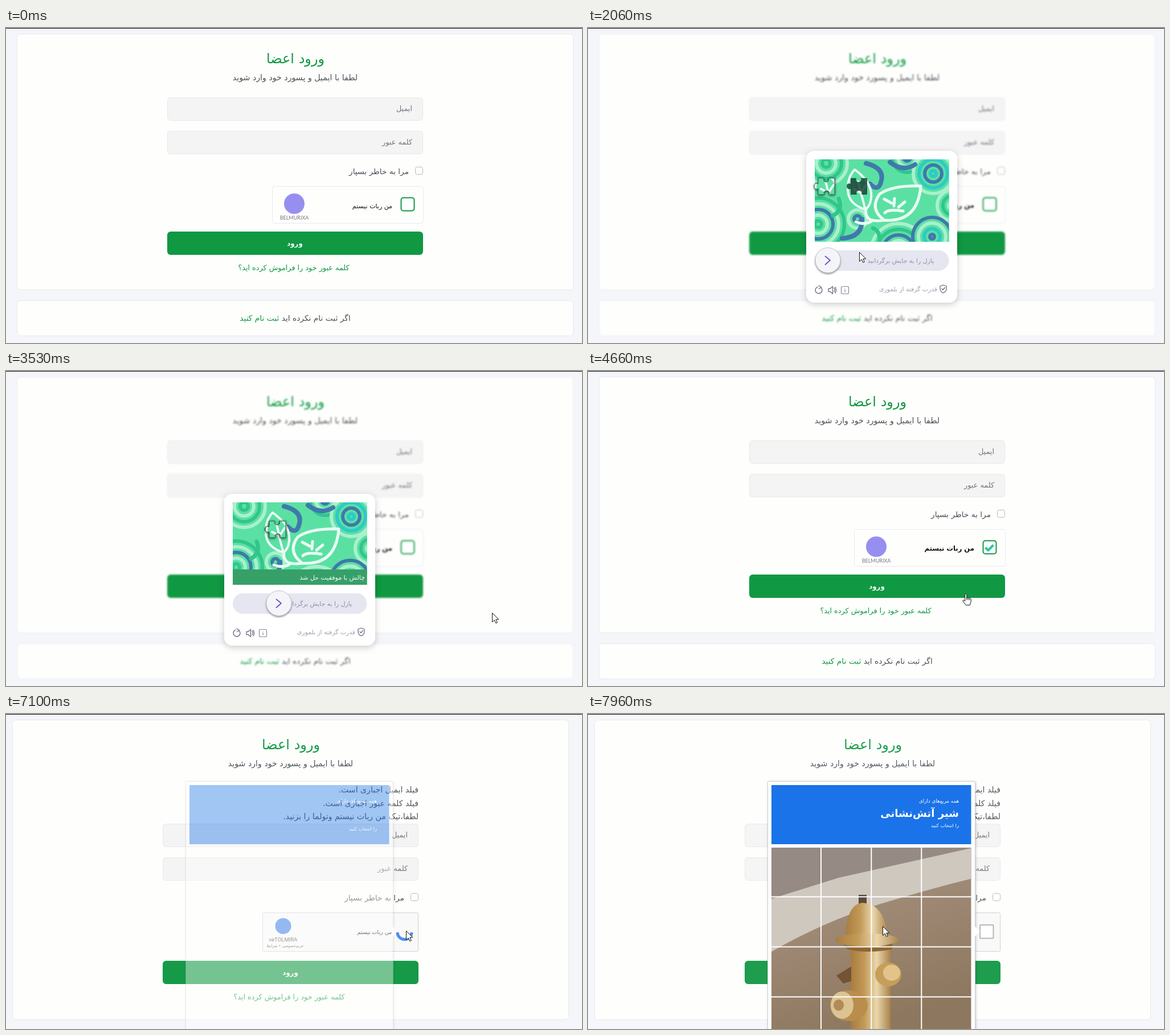
These frames come from a looping animation (1011 px wide and 554 px high, 8 s). An HTML page:

```html
<!DOCTYPE html>
<html lang="fa">
<head>
<meta charset="utf-8">
<style>
html, body { margin: 0; width: 100%; height: 100%; overflow: hidden; background: #f4f6fa; }
svg { display: block; }
text { font-family: "DejaVu Sans", sans-serif; direction: rtl; }
.latin { direction: ltr; }
#modalCard { filter: drop-shadow(0 3px 6px #0003); }
#knob circle { filter: drop-shadow(0 2px 1.5px #0006); }
#piece { filter: drop-shadow(0 1px 2px #000a); }
#popupBox { filter: drop-shadow(1px 1px 2px #0003); }
</style>
</head>
<body>
<svg id="stage" width="1011" height="554" viewBox="0 0 1011 554"></svg>
<script>
const GREEN = '#119843', INK = '#4d5158', GREY = '#70757c';

const rect = (x, y, w, h, r, fill, stroke = 'none', extra = '') =>
  `<rect x="${x}" y="${y}" width="${w}" height="${h}" rx="${r}" fill="${fill}" stroke="${stroke}" ${extra}/>`;
const text = (x, y, size, str, fill = INK, extra = '') =>
  `<text x="${x}" y="${y}" font-size="${size}" fill="${fill}" ${extra}>${str}</text>`;
const line = (d, color, width, extra = '') =>
  `<path d="${d}" fill="none" stroke="${color}" stroke-width="${width}" stroke-linecap="round" stroke-linejoin="round" ${extra}/>`;
const mid = 'text-anchor="middle"';

// Login form; the two pages differ by how far the lower parts are pushed down.
function form(x, pushFields, pushButton, cardHeight) {
  const field = (y, label) => rect(x + 264.5, y + .5, 448, 40, 5, '#f4f4f5', '#e6e7e9') +
    text(x + 694, y + 24, 12.8, label, GREY);
  const f = pushFields, b = pushButton;
  return rect(x + .5, 10.5, 976, cardHeight, 6, '#fefffd', '#e6e8ec') +
    text(x + 489, 62, 24, 'ورود اعضا', GREEN, mid) +
    text(x + 488.5, 92, 14.2, 'لطفا با ایمیل و پسورد خود وارد شوید', INK, mid) +
    field(122 + f, 'ایمیل') + field(181 + f, 'کلمه عبور') +
    rect(x + 699.5, 244.5 + f, 13, 13, 3, '#fff', '#b4b8be') +
    text(x + 688, 257 + f, 13.7, 'مرا به خاطر بسپار') +
    rect(x + 264, 358 + b, 449, 41, 6, GREEN) +
    text(x + 488, 383 + b, 11.8, 'ورود', '#fff', mid + ' font-weight="bold"') +
    text(x + 486, 426 + b, 12.8, 'کلمه عبور خود را فراموش کرده اید؟', GREEN, mid);
}

const firstPage = form(19, 0, 0, 450) +
  rect(19.5, 479.5, 976, 62, 6, '#fefffd', '#e6e8ec') +
  text(507.5, 515, 13.8, `اگر ثبت نام نکرده اید <tspan fill="${GREEN}">ثبت نام کنید</tspan>`, INK, mid) +
  rect(467.5, 278.5, 265, 65, 4, '#fefffd', '#e6e8f0') +
  '<circle cx="506" cy="309" r="18" fill="#968ff0"/>' +
  text(506, 337, 9, 'BELMURIXA', '#77777f', mid + ' class="latin" style="font-family:Lato,sans-serif"') +
  text(678, 317, 11, 'من ربات نیستم', '#111', 'id="labelPlain"') +
  text(678, 316, 11.6, 'من ربات نیستم', '#111', 'id="labelBold" font-weight="bold"') +
  rect(693.5, 298.5, 23, 23, 4, '#fff', GREEN, 'stroke-width="2"') +
  line('M697.5 310.5l5 5 9-9.5', '#2fc3a0', 4, 'id="check" style="stroke-linecap:butt"');

const secondPage = form(11, 71, 76, 527) +
  ['فیلد ایمیل اجباری است.', 'فیلد کلمه عبور اجباری است.', 'لطفا،تیک من ربات نیستم وتولما را بزنید.']
    .map((s, i) => text(724, 138 + 23.7 * i, 14.1, s)).join('') +
  rect(450.5, 349.5, 273, 68, 2, '#f9f9f9', '#d0d0d0') +
  '<circle cx="486.5" cy="373" r="14" fill="#4a86e8"/>' +
  text(486.5, 400, 9.6, 'veTOLMIRA', '#555', mid + ' class="latin" style="font-family:Roboto,sans-serif"') +
  text(490, 410, 6.6, 'حریم&zwnj;خصوصی • شرایط', '#555', mid) +
  text(677, 387, 9.5, 'من ربات نیستم', '#111') +
  '<g id="box">' + rect(688, 371, 23.5, 23.5, 1, '#fff', '#b4b4b4', 'stroke-width="2"') + '</g>' +
  `<g id="spinner">${line('M687 384a12.5 12.5 0 0 0 25 0', '#4a8af4', 5, 'style="stroke-linecap:butt"')}</g>`;

// Puzzle artwork: concentric swirls with two leaves on top.
const MINT = '#5be0a3', PALE = '#a9f0cd', LEAF = '#31c68b', BLUE = '#4079ab', TEAL = '#2ecbc4', WHITE = '#e9fdf3';
const rings = (x, y, r, ...colors) => colors.map((c, i) =>
  `<circle cx="${x}" cy="${y}" r="${r + 10 * (colors.length - 1 - i)}" fill="${MINT}" stroke="${c}" stroke-width="6"/>`).join('');
const art = rect(398, 231, 236, 145, 0, MINT) +
  rings(418, 238, 7, PALE, LEAF, PALE, LEAF) +
  rings(560, 228, 6, LEAF, PALE, BLUE) +
  rings(545, 392, 8, PALE, LEAF, BLUE, PALE, LEAF) +
  rings(640, 312, 7, PALE, LEAF, PALE) +
  rings(404, 345, 6, LEAF, PALE, BLUE, PALE, LEAF) +
  rings(606, 256, 5, PALE, TEAL, BLUE, TEAL) +
  rings(604, 367, 4, BLUE, PALE, TEAL, BLUE) +
  rings(473, 336, 6, PALE, BLUE) +
  line('M488 238Q520 246 515 268T495 274M530 236Q553 254 574 240', BLUE, 8) +
  line('M446 370Q482 368 481 336', BLUE, 8) +
  line('M440 300Q448 320 430 330M500 352Q512 356 512 374', LEAF, 7) +
  line('M488 318Q484 344 520 338M470 341Q488 348 500 338', WHITE, 5) +
  line('M468 249Q500 272 497 299Q495 314 487 319Q455 310 456 281Q456 262 468 249Z', WHITE, 4, `style="fill:${MINT}"`) +
  line('M474 270L479 290L488 276M466 283L479 290L486 316', WHITE, 4) +
  line('M584 278Q579 342 520 338Q493 318 512 292Q535 276 584 278Z', WHITE, 5, `style="fill:${MINT}"`) +
  line('M520 301L533 308M538 300L537 313M521 325Q527 318 553 322M545 315L556 306', WHITE, 5);
const jigsaw = 'M461 264h10q-2 6 4 7 6-1 4-7h11v29h-10q2-6-4-7-7 1-4 7h-11v-10q-7 2-7-5 0-6 7-4z';

const modal = rect(383, 216, 265, 267, 14, '#fff', 'none', 'id="modalCard"') +
  '<use href="#art" clip-path="url(#artClip)"/>' +
  `<path d="${jigsaw}" fill="#173c31" opacity=".82"/>` +
  `<g id="piece"><g clip-path="url(#pieceClip)"><use href="#art"/></g><path d="${jigsaw}" fill="none" stroke="#3a5a50"/></g>` +
  '<g id="success">' + rect(398, 349, 235.5, 27, 0, '#37a068') +
  text(630, 367, 11, 'چالش با موفقیت حل شد', '#fff') + '</g>' +
  rect(398, 391, 235.5, 36, 18, '#e6e6f0') +
  text(607, 413, 10.8, 'پازل را به جایش برگردانید', '#8d8da6') +
  '<g id="knob"><circle cx="421" cy="408.5" r="22" fill="#f5f5f9" stroke="#c4c4cc"/>' +
  line('M416.5 401.5l8.5 7-8.5 7.5', '#5f55cf', 1.8) + '</g>' +
  text(613, 463, 10.8, 'قدرت گرفته از بلموری', '#a0a0b0') +
  line('M623.5 452l5.5 2v4.5q0 5-5.5 7.5q-5.5-2.5-5.5-7.5v-4.5zM621 458.5l2 2 3.5-4', '#6a6a80', 1.3) +
  line('M409 456.5a6 6 0 1 1-6-1.2M405 453l4.5 3-4 2.5', '#6a6a80', 1.4) +
  line('M422 458.5h3l4.5-4v13l-4.5-4h-3zM432 457q2.5 3.5 0 7M434 455.5q3 5.5 0 10.5', '#6a6a80', 1.3) +
  rect(444.5, 454.5, 13, 13, 2.5, 'none', '#8a8a9c', 'stroke-width="1.2"') +
  line('M451 460v4.5M451 457.5v.1', '#8a8a9c', 1.2);

const photo = rect(322, 235, 350.5, 320, 0, '#958b84') +
  '<path d="M322 325L440 288L672 236V560H322Z" fill="#cfc8bf"/>' +
  '<path d="M322 418Q420 362 520 332T672 290V560H322Z" fill="url(#grass)"/>' +
  '<path d="M475 318h14v18h-14z" fill="#5b4a39"/>' +
  '<g fill="url(#metal)"><path d="M461 405H531V560H461Z"/>' +
  '<path d="M452 396Q453 334 482 332Q520 334 526 390Z"/>' +
  '<ellipse cx="490" cy="397" rx="56" ry="11"/></g>' +
  '<path d="M448 406q45 10 86-2v10q-45 8-78 0z" fill="#8d6733"/>' +
  '<path d="M436 460l26-16v26l-14 4z" fill="#735333"/>' +
  '<ellipse cx="527" cy="458" rx="23" ry="21" fill="#c79d5b"/><ellipse cx="533" cy="455" rx="15" ry="14" fill="#e2c48b"/>' +
  '<ellipse cx="458" cy="513" rx="33" ry="27" fill="#b98d4c"/><ellipse cx="446" cy="512" rx="20" ry="24" fill="#dcc394"/>' +
  '<ellipse cx="440" cy="512" rx="9" ry="10" fill="#b08b56"/>' +
  line('M409 235V554M497.3 235V554M585.3 235V554M322 321.5H672M322 409.5H672M322 497.5H672', '#fff', 2);

const popup = rect(315.5, 118.5, 364, 460, 2, '#fff', '#ccc', 'id="popupBox"') +
  '<path d="M679 374L688 382.5L679 391Z" fill="#fff"/>' +
  rect(322, 125, 350.5, 104, 0, '#1a73e8') +
  text(651, 156, 8.7, 'همه مربع&zwnj;های دارای', '#fff') +
  text(651, 199, 8.5, 'را انتخاب کنید', '#fff', 'id="choose"') +
  '<g id="loaded">' + text(651, 181, 18, 'شیر آتش&zwnj;نشانی', '#fff', 'font-weight="bold"') + photo + '</g>';

const pointers =
  '<path id="arrow" d="M.5 .5v16l3.7-3.5 2.6 5.5 2.5-1.1-2.5-5.4h5z"/>' +
  '<path id="hand" d="M5 12V2.5q1.5-3 3 0V8q6-.5 7.5 2.5v4l-2 6.5H6.5L1 13.5q.5-3 4 .5zM8 8v4M10.5 8.5v3.5M13 9.5V12"/>' +
  '<path id="beam" fill="none" d="M0 .5h6M3 .5v16M0 16.5h6"/>';

document.getElementById('stage').innerHTML = `<defs>
  <g id="art">${art}</g>
  <clipPath id="artClip"><rect x="398" y="231" width="235.5" height="145"/></clipPath>
  <clipPath id="pieceClip"><path d="${jigsaw}"/></clipPath>
  <linearGradient id="grass" x2=".4" y2="1"><stop stop-color="#a5927e"/><stop offset=".5" stop-color="#9b8570"/><stop offset="1" stop-color="#8d775e"/></linearGradient>
  <linearGradient id="metal"><stop stop-color="#a87c3e"/><stop offset=".35" stop-color="#c39a58"/><stop offset=".65" stop-color="#ead7ab"/><stop offset="1" stop-color="#a9834b"/></linearGradient>
</defs>
<rect width="1011" height="554" fill="#f4f6fa"/>
<g id="first">${firstPage}</g><g id="second">${secondPage}</g>
<g id="modal">${modal}</g>
<rect id="veil" width="1011" height="554" fill="#fff"/>
<g id="popup">${popup}</g>
<g id="cursor" fill="#fff" stroke="#111" stroke-linejoin="round">${pointers}</g>
<rect width="1011" height="1" fill="#0c0c10"/>`;

const el = {};
for (const node of document.querySelectorAll('#stage [id]')) el[node.id] = node;
const show = (id, on) => { el[id].style.display = on ? '' : 'none'; };
const fade = (id, value) => { show(id, value > 0); el[id].style.opacity = value; };
const move = (id, x, y = 0) => el[id].setAttribute('transform', `translate(${x} ${y})`);
const ramp = (t, from, to) => Math.min(1, Math.max(0, (t - from) / (to - from)));
const smooth = k => k * k * (3 - 2 * k);

// Cursor stops: time, x, y.
const route = [
  [130, 334, 146], [350, 470, 250], [560, 610, 386], [760, 702, 310], [860, 704, 311],
  [930, 749, 335], [1000, 801, 336], [1830, 801, 336], [2060, 476, 394], [2180, 418, 404],
  [2280, 418, 404], [2630, 474, 404], [2930, 474, 404], [3000, 476, 404], [3230, 476, 404],
  [3500, 853, 425], [4000, 853, 425], [4640, 657, 391], [4830, 650, 386], [5030, 624, 383],
  [5730, 624, 383], [6080, 731, 411], [6400, 702, 381], [7760, 702, 381], [7940, 517, 373]
];
function cursorAt(t) {
  const next = route.findIndex(p => p[0] > t);
  if (next < 1) return route[next < 0 ? route.length - 1 : 0].slice(1);
  const [t0, x0, y0] = route[next - 1], [t1, x1, y1] = route[next];
  const k = smooth(ramp(t, t0, t1));
  return [x0 + (x1 - x0) * k, y0 + (y1 - y0) * k];
}

function draw(t) {
  const onSecond = t >= 5430;
  show('first', !onSecond);
  show('second', onSecond);

  const open = ramp(t, 1130, 1400) * (1 - ramp(t, 4000, 4240));
  fade('modal', open);
  el.first.style.filter = open > 0 ? `blur(${1.4 * open}px)` : 'none';
  show('labelPlain', t < 1160);
  show('labelBold', t >= 1160);
  fade('check', ramp(t, 4200, 4500));

  const slide = 56 * smooth(ramp(t, 2280, 2630)) + 2 * ramp(t, 2930, 3000);
  move('knob', slide);
  move('piece', slide - 57);
  fade('success', ramp(t, 3230, 3450));

  fade('spinner', ramp(t, 6560, 6720) * (1 - ramp(t, 7360, 7440)));
  fade('box', 1 - ramp(t, 6560, 6680) + ramp(t, 7400, 7500));
  el.spinner.setAttribute('transform', `rotate(${(t - 7100) * .36} 699.5 384)`);

  const appear = ramp(t, 6940, 7340);
  fade('popup', appear);
  fade('veil', .05 * appear);
  const ready = t >= 7200;
  show('loaded', ready);
  move('choose', 0, ready ? 0 : 6);

  const [x, y] = cursorAt(t);
  const inForm = !onSecond && open === 0 && x > 283 && x < 732;
  const dragging = t >= 2130 && t < 3260;
  const hand = dragging || inForm && y > 358 && y < 399;
  const beam = inForm && (y > 122 && y < 162 || y > 181 && y < 221);
  show('cursor', t >= 130);
  move('cursor', x, y);
  show('hand', hand);
  show('beam', beam);
  show('arrow', !hand && !beam);
}

const start = performance.now();
function tick(now) {
  draw(Math.max(0, now - start) % 8000);
  requestAnimationFrame(tick);
}
draw(0);
requestAnimationFrame(tick);
</script>
</body>
</html>
```
